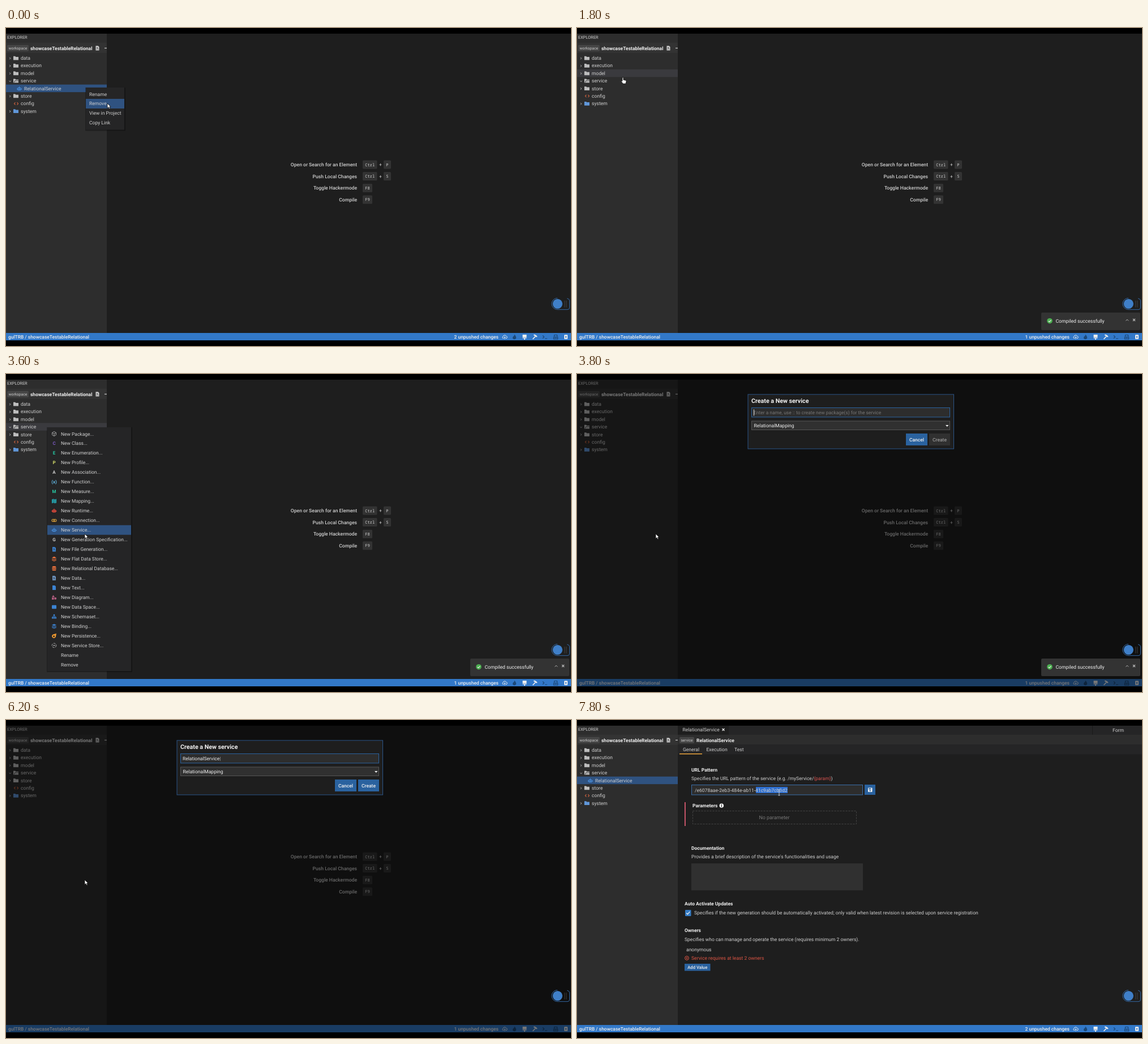
Recreate the animation shown at these times as an HTML page. Size 998 by 561 pixels, loop 8 s.

```html
<!DOCTYPE html>
<html lang="en">
<head>
<meta charset="utf-8">
<title>Service editor</title>
<style>
  html, body { margin: 0; width: 100%; height: 100%; overflow: hidden; background: #000; }
  svg { display: block; width: 100%; height: 100%; }
  text { font-family: Roboto, sans-serif; text-rendering: geometricPrecision; white-space: pre; }
  .mono { font-family: "Noto Sans Mono", monospace; }
</style>
</head>
<body>
<svg id="stage" viewBox="0 0 998 561"></svg>
<script>
const LOOP = 8000, TICK = 200;
const REMOVED = 400, TOAST_ON = 1000, MENU_ON = 2200, DIALOG_ON = 3800, TOAST_OFF = 5000, CREATED = 6400, SELECTED = 7600;
const SERVICE = 'RelationalService', PROJECT = 'showcaseTestableRelational';
const SIDE = '#2d2d2d', EDITOR = '#1e1e1e', TEXT = '#d0d0d0', WHITE = '#f0f0f0';
const HIGHLIGHT = '#2f5280', BUTTON = '#2a629f', BLUE = '#3f7fc8', STATUS = '#3278c8';
const TREE_TOP = 53, TREE_ROW = 13.37, MENU_TOP = 105.5, MENU_ROW = 16.97;

const rect = (x, y, w, h, fill, more = '') =>
  `<rect x="${x}" y="${y}" width="${w}" height="${h}" fill="${fill}" ${more}/>`;
const circle = (x, y, r, fill, more = '') => `<circle cx="${x}" cy="${y}" r="${r}" fill="${fill}" ${more}/>`;
const shape = (d, fill) => `<path d="${d}" fill="${fill}"/>`;
const line = (d, color, width = 1) => `<path d="${d}" fill="none" stroke="${color}" stroke-width="${width}"/>`;
const at = (x, y, content) => `<g transform="translate(${x} ${y})">${content}</g>`;
// y is the middle of the capitals
const text = (x, y, value, { size = 8.55, fill = TEXT, weight = 400, anchor = 'start', mono } = {}) =>
  `<text x="${x}" y="${y + size * .355}" font-size="${size}" fill="${fill}" font-weight="${weight}"
    text-anchor="${anchor}" ${mono ? 'class="mono"' : ''}>${value}</text>`;
const bold = (x, y, value, size = 8.5) => text(x, y, value, { size, weight: 700, fill: WHITE });
const cross = (x, y, color) => line(`M${x - 2} ${y - 2}l4 4m0-4l-4 4`, color, 1.2);
const tag = (x, y, w, label) =>
  rect(x, y - 5.5, w, 11, '#454545', 'rx="1.5"') + text(x + w / 2, y, label, { size: 6.7, anchor: 'middle' });
const button = (x, y, w, h, label, { on = true, size = 8.5 } = {}) =>
  rect(x, y, w, h, on ? BUTTON : '#303030') +
  text(x + w / 2, y + h / 2, label, { size, anchor: 'middle', fill: on ? WHITE : '#999', weight: 500 });

// Icons are centred on the origin
const ICONS = {
  letter: (c, l) => text(0, 0, l, { size: 8, fill: c, weight: 700, anchor: 'middle' }),
  cube: c => line('M0-4L3.5-2V2L0 4L-3.5 2V-2ZM-3.5-2L0 0L3.5-2M0 0V4', c, .9),
  map: c => shape('M-4-3L-1.5-4V3L-4 4ZM-1-4L1.2-3V4L-1 3ZM1.7-3L4-4V3L1.7 4Z', c),
  robot: c => rect(-3.3, -2, 6.6, 5, c, 'rx="1.6"') + rect(-4.4, -.4, 8.8, 2.2, c, 'rx="1"') +
    rect(-.5, -4, 1, 2.4, c) + circle(-1.4, .4, .7, '#222') + circle(1.4, .4, .7, '#222'),
  link: c => rect(-4, -2, 5, 4, 'none', `rx="2" stroke="${c}" stroke-width="1.1"`) +
    rect(-1, -2, 5, 4, 'none', `rx="2" stroke="${c}" stroke-width="1.1"`),
  doc: (c, mark) => shape('M-3-4H1.2L3-2.2V4H-3Z', c) + (mark ? line('M-1.6 2.2L0 .2L1.6 2.2M-1.6-1H1', '#222', .8) : ''),
  stack: c => shape('M0-4L4-2.2L0-.5L-4-2.2Z', c) + line('M-3.8 0L0 1.6L3.8 0M-3.8 2.2L0 3.8L3.8 2.2', c, 1.1),
  db: c => rect(-3.5, -4, 7, 8, c, 'rx="2.2"') + line('M-3.5-1.4Q0 .2 3.5-1.4M-3.5 1.3Q0 2.9 3.5 1.3', '#252526', .8),
  shapes: c => shape('M-1.5-4L1-.2H-4ZM-4 .6H-.4V4H-4Z', c) + circle(2.2, 2, 2, c),
  block: c => rect(-4, -3.3, 8, 6.6, c, 'rx="1"'),
  nodes: c => rect(-1.2, -4, 2.4, 2.6, c) + [-4, -1.2, 1.6].map(x => rect(x, 1, 2.4, 2.6, c)).join('') +
    line('M0-2V1M-2.8 1V-.2H2.8V1', c, .8),
  comet: c => shape('M4-4L3 1.5A3.5 3.5 0 1 1-2.2-2.4Z', c) + circle(-.4, 1, 1.5, '#252526'),
  ring: c => circle(0, 0, 3.8, 'none', `stroke="${c}" stroke-dasharray="4 1.4"`) + line('M-1.8 0H1.8', c, 1.4),
};
const MENU = [
  ['Package', 'cube', '#aaa'], ['Class', 'letter', '#7b59c0', 'C'], ['Enumeration', 'letter', '#27c9a4', 'E'],
  ['Profile', 'letter', '#d3dc6a', 'P'], ['Association', 'letter', '#ccc', 'A'], ['Function', 'letter', '#62b8e4', '(x)'],
  ['Measure', 'letter', '#27c9a4', 'M'], ['Mapping', 'map', '#25a5b0'], ['Runtime', 'robot', '#d9483b'],
  ['Connection', 'link', '#dba13a'], ['Service', 'robot', '#4486d0'], ['Generation Specification', 'letter', '#ccc', 'G'],
  ['File Generation', 'doc', '#3c83d2', 1], ['Flat Data Store', 'stack', '#e8703c'], ['Relational Database', 'db', '#e8703c'],
  ['Data', 'doc', '#6d94c0', 1], ['Text', 'doc', '#3c83d2'], ['Diagram', 'shapes', '#b25d80'], ['Data Space', 'block', '#3c83d2'],
  ['Schemaset', 'nodes', '#3c83d2'], ['Binding', 'stack', '#3c83d2'], ['Persistence', 'comet', '#f09a30'], ['Service Store', 'ring', '#aaa'],
];

const POINTER = [
  [0, 179, 133], [600, 179, 133], [1200, 140, 92], [1600, 92, 77], [1800, 81, 87.5], [2000, 73, 94], [2200, 73, 94],
  [2600, 118, 306], [3000, 135, 312], [3400, 139, 282], [6800, 139, 282], [7600, 357, 128], [LOOP, 357, 128],
];
function pointerAt(t) {
  const next = Math.max(1, POINTER.findIndex(p => p[0] >= t));
  const [t0, x0, y0] = POINTER[next - 1], [t1, x1, y1] = POINTER[next];
  const u = Math.max(0, (t - t0) / (t1 - t0)), k = u * u * (3 - 2 * u);
  return [x0 + (x1 - x0) * k, y0 + (y1 - y0) * k];
}

function folder(y, color, open) {
  return shape(`M13 ${y - 3.3}h3.3l1 1.2H22v5.6H13Z`, color) +
    (open ? line(`M14.4 ${y + 3}l1.5-3.2h6.6`, SIDE, .9) : '');
}

function sidebar(t, hoverRow) {
  const hasService = t < REMOVED || t >= CREATED;
  const rows = ['data', 'execution', 'model', 'service', ...(hasService ? [SERVICE] : []), 'store', 'config', 'system'];
  let out = rect(0, 10, 178, 528, SIDE) + text(2, 16.5, 'EXPLORER', { size: 7.4 }) +
    rect(0, 26, 178, 18, '#333') + tag(2, 35.5, 38, 'workspace') + bold(43, 35.5, PROJECT) +
    at(161.5, 35.5, ICONS.doc('#ccc', 1)) + line('M174 35.5h4', '#ccc', 1.2);
  rows.forEach((name, i) => {
    const y = TREE_TOP + i * TREE_ROW;
    if (name === SERVICE) {
      out += rect(0, y - 6.7, 178, TREE_ROW, HIGHLIGHT) + at(23.5, y + .5, ICONS.robot('#4688d4')) + text(32, y, name);
      return;
    }
    if (i === hoverRow) out += rect(0, y - 6.7, 178, TREE_ROW, '#3a3a3e');
    if (name === 'config') out += line(`M16.5 ${y - 2}l-2 2.2l2 2.2M19.5 ${y - 2}l2 2.2l-2 2.2`, '#d06440', 1.1);
    else {
      out += name === 'service' ? line(`M5.5 ${y}l1.7 1.6l1.7-1.6`, '#bbb') : line(`M6.3 ${y - 1.2}l1.6 1.7l-1.6 1.7`, '#bbb');
      out += folder(y, name === 'system' ? '#6096d8' : '#bdbdbd', name === 'service');
    }
    out += text(26, y, name, { size: 8.6 });
  });
  return out;
}

function shortcuts() {
  const key = (x, y, w, label) => rect(x, y - 7.5, w, 15, '#333', 'rx="1.5"') +
    text(x + w / 2, y, label, { size: 7.1, anchor: 'middle', mono: true });
  return [['Open or Search for an Element', 'P'], ['Push Local Changes', 'S'], ['Toggle Hackermode', 'F8'], ['Compile', 'F9']]
    .map(([label, last], i) => {
      const y = 241 + i * 20.6;
      return text(620, y, label, { size: 8.6, weight: 500, anchor: 'end' }) + (last.length > 1
        ? key(630, y, 17, last)
        : key(630, y, 25.5, 'Ctrl') + text(661.5, y, '+', { anchor: 'middle' }) + key(667, y, 13, last));
    }).join('');
}

function form(t) {
  const selected = t >= SELECTED;
  return rect(178, 10, 820, 16, '#252526') + rect(178, 10, 90, 16, EDITOR) + line('M910.5 10v16', '#1a1a1a') +
    text(186.5, 17, SERVICE, { size: 8.5 }) + cross(258.5, 17, WHITE) +
    text(956, 17.5, 'Form', { anchor: 'middle', size: 8.6 }) +
    rect(178, 26, 820, 17, SIDE) + tag(181, 35.5, 26, 'service') + bold(211, 35.5, SERVICE) +
    rect(178, 43, 820, 17.5, '#252526') + rect(181, 59, 40, 1.5, '#eba43c') +
    text(187, 52, 'General') + text(228.5, 52, 'Execution') + text(278, 52, 'Test') +
    bold(202, 88, 'URL Pattern') +
    text(202, 103, 'Specifies the URL pattern of the service (e.g. /myService/<tspan fill="#d9534f">{param}</tspan>)') +
    rect(202.5, 114.5, 302, 17.5, '#2d2d2d', `stroke="${selected ? '#3a6ea8' : '#3c3c3c'}"`) +
    (selected ? rect(316, 118, 56, 11, '#2e6fd0') : '') +
    text(208, 123.5, '/e6078aae-2eb3-484e-ab11-41c9ab7cb3d2', { size: 8.53 }) +
    rect(508, 114, 19, 18, BUTTON) + rect(514, 119.5, 7.5, 7.5, WHITE, 'rx="1"') +
    rect(515.3, 120.5, 4, 2, BUTTON) + circle(517.7, 124.7, 1.2, BUTTON) +
    rect(190, 145, 1.8, 42, '#d65a70') + bold(204, 150.5, 'Parameters') + circle(255.3, 151, 3.8, WHITE) +
    rect(254.7, 150.3, 1.3, 3, EDITOR) + rect(254.7, 148.4, 1.3, 1.2, EDITOR) +
    rect(204.5, 160.5, 289, 23, 'none', 'stroke="#444" stroke-dasharray="3 2"') +
    text(348.5, 171.5, 'No parameter', { fill: '#777', anchor: 'middle', size: 8.9 }) +
    bold(202, 226, 'Documentation') + text(202, 241, "Provides a brief description of the service's functionalities and usage") +
    rect(202, 253, 303, 47.5, '#303030') +
    bold(190, 323.5, 'Auto Activate Updates') + rect(191, 335, 10.5, 11, '#347bc4', 'rx="1"') +
    line('M193.3 340.5l2 2.2l4-4.6', WHITE, 1.3) +
    text(207, 339.5, 'Specifies if the new generation should be automatically activated; only valid when latest revision is selected upon service registration') +
    bold(190, 371, 'Owners') + text(190, 386.5, 'Specifies who can manage and operate the service (requires minimum 2 owners).') +
    text(193, 404.5, 'anonymous') + circle(194, 420, 3.4, 'none', 'stroke="#dd5544"') +
    line('M192.6 418.6l2.8 2.8m0-2.8l-2.8 2.8', '#dd5544', .9) +
    text(202, 420, 'Service requires at least 2 owners', { fill: '#dd5544', size: 8.6 }) +
    button(190, 430, 45.5, 12.5, 'Add Value', { size: 7.7 });
}

function statusBar(t) {
  const count = t < REMOVED || t >= CREATED ? 2 : 1, dim = '#1c4878';
  return rect(0, 538, 998, 13, STATUS) +
    text(147, 545, `gulTRB / ${PROJECT}`, { anchor: 'end', size: 8.45, fill: WHITE, weight: 500 }) +
    text(870, 545, `${count} unpushed changes`, { anchor: 'end', size: 8.47, fill: WHITE, weight: 500 }) +
    at(881, 545, line('M-2 2.5H-3A2 2 0 0 1-3-1A3 3 0 0 1 2.5-1.5A2.1 2.1 0 0 1 3 2.5H2M0 4V0M-1.6 1.4L0-.3L1.6 1.4', WHITE)) +
    at(898, 545, shape('M0-4.5Q4 0 3 2.5Q0 6-3 2.5Q-3.5 0-1.3-1.5Q0-2 0-4.5', dim)) +
    at(916, 545, rect(-3.5, -4, 7, 4.8, WHITE) + rect(-3.5, 1.4, 7, 1.2, WHITE) + rect(-1, 2.4, 2, 2.4, WHITE)) +
    at(934, 545, line('M-3.5 3.8L1.5-1.5', WHITE, 1.6) + line('M-1.8-3.2Q1-4 3.8 0', WHITE, 2)) +
    at(952, 545, line('M-4-2.5L-1.5 0L-4 2.5M0 3H4', dim, 1.2)) +
    at(971, 545, line('M-2.5-1V-3.5H2.5V-1M-3.5 4V.2H3.5V4ZM-2 2H2', dim, 1.2)) +
    at(989, 545, rect(-3, -3.8, 6, 7.6, WHITE, 'rx="1"') + shape('M0-2L1.8 .3H.6V2H-.6V.3H-1.8Z', STATUS));
}

function menuPanel(x, y, w, h) {
  return rect(x - 1, y, w + 3, h + 2, '#000', 'opacity=".3"') + rect(x, y, w, h, '#252526');
}

function itemMenu() {
  return menuPanel(141, 105, 68, 74.5) + rect(141, 125, 68, 17, HIGHLIGHT) +
    ['Rename', 'Remove', 'View in Project', 'Copy Link'].map((label, i) => text(147, 116.5 + i * 16.9, label)).join('');
}

function createMenu(hoverY) {
  const hover = Math.round((hoverY - MENU_TOP) / MENU_ROW);
  const labels = [...MENU.map(([name]) => `New ${name}...`), 'Rename', 'Remove'];
  return menuPanel(73, 94, 148, 430) + labels.map((label, i) => {
    const y = MENU_TOP + i * MENU_ROW, [, icon, color, detail] = MENU[i] || [];
    return (i === hover ? rect(73, y - 8.5, 148, MENU_ROW, HIGHLIGHT) : '') +
      (icon ? at(85, y, ICONS[icon](color, detail)) : '') + text(97, y, label, { size: 8.47 });
  }).join('');
}

function dialog(t) {
  const typed = t < 4200 ? 0 : t < 4600 ? 1 : Math.min(SERVICE.length, 1 + Math.round((t - 4400) / 75));
  const entry = SERVICE.slice(0, typed);
  return rect(0, 10, 998, 541, '#000', 'opacity=".5"') +
    rect(302, 36, 363.5, 96, EDITOR, 'stroke="#2a5488"') + bold(308, 47.5, 'Create a New service', 10.7) +
    rect(308.5, 59.5, 350, 16.5, '#2d2d2d', `stroke="${BUTTON}"`) +
    (typed ? text(312, 68, `${entry}<tspan font-weight="300">|</tspan>`, { fill: WHITE, size: 8.5 })
      : text(312, 68, 'Enter a name, use :: to create new package(s) for the service', { fill: '#777', size: 8.45 }) +
        rect(312, 62.5, .9, 11, WHITE)) +
    rect(308.5, 83, 350, 15.5, '#303030', 'stroke="#555"') + text(312.5, 90.5, 'RelationalMapping', { fill: WHITE }) +
    shape('M651 90h5.5l-2.75 3Z', WHITE) +
    button(581, 105, 38, 21, 'Cancel') + button(622, 105, 37, 21, 'Create', { on: typed > 0 });
}

function assistant() {
  return line('M974 476.5A10 10 0 0 0 974 496.7H992Q995.5 496.7 995.5 493V481Q995.5 478 991 477', '#3468a4') +
    circle(974.3, 486.6, 8.6, BLUE) +
    [0, 1, 2, 3, 4].map(i => rect(986, 481.5 + i * 2.4, 1.3, 1.2, '#555') + rect(989, 481.5 + i * 2.4, 1.3, 1.2, '#555')).join('');
}

function toast() {
  return rect(820, 502, 175, 31, '#333', 'rx="2"') + circle(835, 516.7, 4.8, '#4caf50') +
    line('M832.7 516.8l1.7 1.7l3-3.2', WHITE, 1.2) + text(845.5, 516.5, 'Compiled successfully', { size: 8.6, fill: WHITE }) +
    line('M969.5 516.5l2.3-2.3l2.3 2.3', '#bbb') + cross(984, 515, '#bbb');
}

function pointer(x, y, kind) {
  const outlined = d => `<path d="${d}" fill="#fff" stroke="#111" stroke-width=".8"/>`;
  return at(x, y, {
    arrow: outlined('M0 0V8.4L2 6.6L3.5 9.6L5 8.9L3.6 6H6.2Z'),
    hand: outlined('M-1 0Q.3-1.3 1 .2V4L5 4.8Q6.3 5.2 6 7L5 10.8H.3L-2.8 6.8Q-2.6 5.2-1 6.3Z'),
    beam: line('M-1.5-5H1.5M0-5V5M-1.5 5H1.5', '#ddd', .9),
  }[kind]);
}

function scene(t) {
  const [x, y] = pointerAt(t), [hoverX, hoverY] = pointerAt(t - 50);
  const menuOpen = t >= MENU_ON && t < DIALOG_ON, dialogOpen = t >= DIALOG_ON && t < CREATED;
  const treeActive = t >= REMOVED && t < MENU_ON;
  const onTree = treeActive && x < 178 && y < 140;
  const hoverRow = menuOpen ? 3 : treeActive && hoverX < 178 ? Math.round((hoverY - TREE_TOP) / TREE_ROW) : -1;
  const onInput = t >= CREATED && x > 202 && x < 505 && y > 114 && y < 132;
  return rect(0, 0, 998, 561, '#000') + rect(178, 10, 820, 528, EDITOR) + sidebar(t, hoverRow) +
    (t >= CREATED ? form(t) : shortcuts()) + statusBar(t) +
    (t < REMOVED ? itemMenu() : '') + (menuOpen ? createMenu(hoverY) : '') + (dialogOpen ? dialog(t) : '') +
    assistant() + (t >= TOAST_ON && t < TOAST_OFF ? toast() : '') +
    pointer(x, y, onInput ? 'beam' : onTree ? 'hand' : 'arrow');
}

const stage = document.getElementById('stage');
const start = performance.now();
let shown = -1;
function play(now) {
  const elapsed = Math.max(0, now - start) % LOOP;
  const t = Math.floor(elapsed / TICK) * TICK;
  if (t !== shown) stage.innerHTML = scene(shown = t);
  requestAnimationFrame(play);
}
play(start);
</script>
</body>
</html>
```
